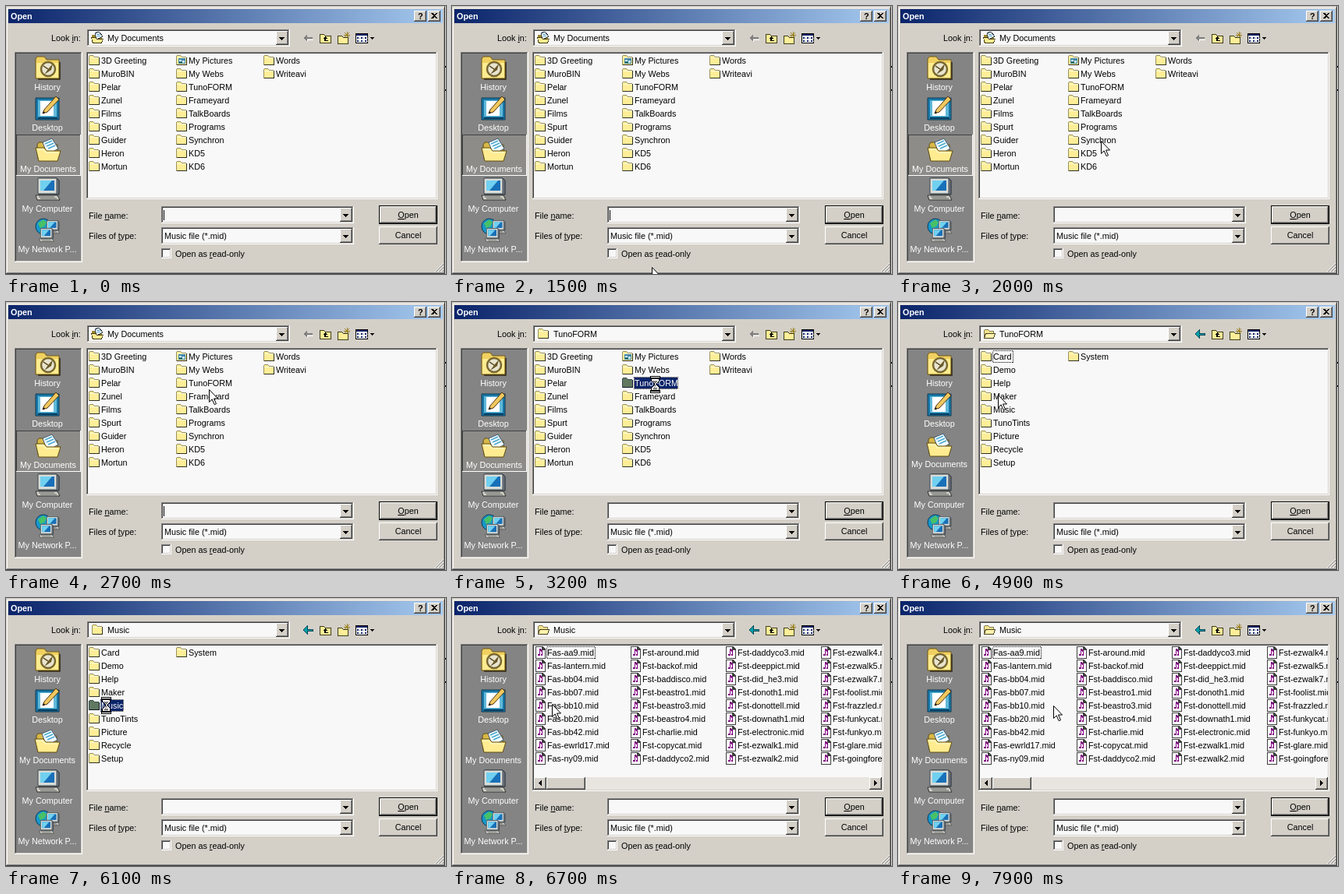
An HTML page for the animation above (8 s loop, 564 by 344 pixels).

```html
<!DOCTYPE html>
<html lang="en">
<head>
<meta charset="utf-8">
<title>Open dialog</title>
<style>
  html, body { margin: 0; width: 100%; height: 100%; overflow: hidden; background: #d4d0c8; }
  svg { display: block; shape-rendering: crispEdges; }
  text { font: 10.8px "Liberation Sans", Arial, sans-serif; white-space: pre; }
  .u { text-decoration: underline; }
  .smooth { shape-rendering: auto; }
</style>
</head>
<body>
<svg id="stage" width="564" height="344" viewBox="0 0 564 344">
  <defs>
    <linearGradient id="title">
      <stop offset="0" stop-color="#0a246a"/><stop offset="1" stop-color="#a6caf0"/>
    </linearGradient>
    <clipPath id="listClip"><path d="M105 61H551V246H105z"/></clipPath>

    <g id="folder">
      <path d="M1 2l1-1h4l2 2h6v11H1z" fill="#989060"/>
      <path d="M2 2h4l2 2h6v9H2z" fill="#ffee98"/>
      <path d="M2 4h12v1H2z" fill="#fffbd8"/>
      <path d="M14 4h1v10H2v-1h12z" fill="#303020"/>
    </g>
    <g id="pickedFolder">
      <path d="M1 2l1-1h4l2 2h6v11H1z" fill="#384a50"/>
      <path d="M2 2h4l2 2h6v9H2z" fill="#607860"/>
      <path d="M14 4h1v10H2v-1h12z" fill="#101828"/>
    </g>
    <g id="openFolder">
      <path d="M1 3l1-1h4l2 2h6v10H1z" fill="#807850"/>
      <path d="M2 3h4l2 2h5v3H2z" fill="#f4e490"/>
      <path d="M3 7h13l-2 7H1z" fill="#484020"/>
      <path d="M4 8h11l-2 5H2z" fill="#fff2ac"/>
    </g>
    <g id="docs">
      <path d="M1 4h5l1 1h7v9H1z" fill="#a08830"/>
      <path d="M5 2l5-2 5 6-8 4z" fill="#fff" stroke="#304050"/>
      <path d="M7 4l4-1M8 6l4-1" stroke="#48a0c8"/>
      <path d="M0 7h6l1 2h9l-2 6H2z" fill="#403810"/>
      <path d="M1 8h5l1 2h8l-2 4H3z" fill="#ffec90"/>
    </g>
    <g id="pictures">
      <use href="#folder"/>
      <path d="M4 5h9v7H4z" fill="#4088a8"/>
      <path d="M5 7h3v2H5zM9 8h3v3H9z" fill="#d8f0f8"/>
      <path d="M5 10h4v1H5z" fill="#205838"/>
    </g>
    <g id="midi">
      <path d="M0 0h9l4 4v12H0z" fill="#404040"/>
      <path d="M1 1h7v4h4v10H1z" fill="#fff"/>
      <path d="M5 3h1l3 3v2h-1l-2-2v6H3v-2h2zM7 10h2v2H7z" fill="#800080"/>
      <path d="M8 7h1v5H8z" fill="#800080"/>
    </g>

    <g id="bigHistory" class="smooth">
      <path d="M1 4l2-3h9l3 4h16v24H1z" fill="#f0d060" stroke="#705818"/>
      <path d="M2 9h28v19H2z" fill="#ffec90"/>
      <path d="M32 8v22H4" fill="none" stroke="#302810" stroke-width="1.5"/>
      <circle cx="17" cy="17" r="9" fill="#e8e4d0" stroke="#786830" stroke-width="2.5"/>
      <path d="M17 17l6-7-2 8-9 6z" fill="#685828"/>
      <path d="M17 17l-6-4" stroke="#503c10" stroke-width="1.5"/>
    </g>
    <g id="bigDesktop" class="smooth">
      <path d="M1 2h30v28H1z" fill="#1878a8" stroke="#103850"/>
      <path d="M4 5h24v21H4z" fill="#60b8d8"/>
      <path d="M7 6h17v19H7z" fill="#fff"/>
      <path d="M4 27h25v2H4z" fill="#0a4060"/>
      <path d="M10 22l2-5L27 0l4 4-15 16z" fill="#f0c860" stroke="#503008"/>
      <path d="M10 22l1-3 2 2z" fill="#000"/>
    </g>
    <g id="bigDocs" class="smooth">
      <path d="M2 9l2-3h8l2 3h14v18H3z" fill="#d8b848" stroke="#605018"/>
      <path d="M9 6l12-5 8 13-14 8z" fill="#f4fcff" stroke="#405870"/>
      <path d="M12 8l9-4M14 11l9-4M16 14l9-4" stroke="#48a8d0" stroke-width="1.5"/>
      <path d="M0 13h11l3 4h18l-4 13H4z" fill="#ffec90" stroke="#604c10"/>
      <path d="M2 15h8l3 4h16" fill="none" stroke="#fffbd8"/>
    </g>
    <g id="pc" class="smooth">
      <path d="M5 1h23l3 3v18H5z" fill="#707880" stroke="#202830"/>
      <path d="M4 1h24v20H4z" fill="#d8dcd8" stroke="#404850"/>
      <path d="M7 4h18v13H7z" fill="#1870b8"/>
      <path d="M7 4h15L11 17H7z" fill="#70d0f0"/>
      <path d="M1 23h28l3 6H3z" fill="#d0d0c8" stroke="#303030"/>
      <path d="M5 25h20M7 27h21" stroke="#606060"/>
    </g>
    <g id="bigNetwork" class="smooth">
      <circle cx="11" cy="11" r="10" fill="#1898c8" stroke="#083860"/>
      <path d="M4 7l7-5 4 4-3 5-5 2zM7 15l6-1 1 5-4 1z" fill="#48c068"/>
      <use href="#pc" transform="translate(13 3) scale(.58)"/>
      <use href="#pc" transform="translate(5 13) scale(.6)"/>
    </g>

    <g id="arrow" class="smooth">
      <path d="M.5.5v16l3.7-3.6 3 6.8 2.3-1-3-6.7h5z" fill="#fff" stroke="#000"/>
    </g>
    <g id="hourglass">
      <path d="M-6-9H7v4H6v3L2 1v1l4 4v3h1v4H-6V9h1V6l4-4V1l-4-4v-2h-1z" fill="#000"/>
      <path d="M-5-8H6v1H-5zM-5 11H6v1H-5zM-4-5H5v2L1 1v1l4 4v3H-4V6l4-4V1l-4-4z" fill="#fff"/>
      <path d="M-2-3h1v1h-1zM0-3h1v1H0zM2-3h1v1H2zM-1-2h1v1h-1zM1-2h1v1H1zM0-1h1v1H0zM0 3h1v1H0zM-1 5h1v1h-1zM1 5h1v1H1zM-2 7h5v1h-5z" fill="#000"/>
    </g>
  </defs>
</svg>
<script>
const FACE = '#d4d0c8', FIELD = '#f8f8f8', NAVY = '#0a246a', DARK = '#404040', MID = '#808080';
const ROW = 17, TOP = 62;

const rect = (x, y, w, h, fill) => `<rect x="${x}" y="${y}" width="${w}" height="${h}" fill="${fill}"/>`;
const path = (d, fill, stroke = 'none') => `<path d="${d}" fill="${fill}" stroke="${stroke}"/>`;
const icon = (id, x, y) => `<use href="#${id}" x="${x}" y="${y}"/>`;
const text = (s, x, y, fill = '#000', more = '') => `<text x="${x}" y="${y}" fill="${fill}" ${more}>${s}</text>`;
const centered = (s, x, y, fill) => text(s, x, y, fill, 'text-anchor="middle"');
const bold = (s, x, y, fill) => text(s, x, y, fill, 'style="font-weight:bold"');
const group = (id, body, more = '') => `<g id="${id}" ${more}>${body}</g>`;
const key = c => `<tspan class="u">${c}</tspan>`;

// Two nested one-pixel edges around a fill
const bevel = (x, y, w, h, fill, [lightOut, darkOut, lightIn, darkIn]) =>
  rect(x, y, w, h, darkOut) + rect(x, y, w - 1, h - 1, lightOut) +
  rect(x + 1, y + 1, w - 2, h - 2, darkIn) + rect(x + 1, y + 1, w - 3, h - 3, lightIn) +
  rect(x + 2, y + 2, w - 4, h - 4, fill);
const raised = (x, y, w, h) => bevel(x, y, w, h, FACE, ['#fff', DARK, FACE, MID]);
const sunken = (x, y, w, h, fill = FIELD) => bevel(x, y, w, h, fill, [MID, '#fff', DARK, FACE]);

const combo = (x, y, w, h) => sunken(x, y, w, h) + raised(x + w - 18, y + 2, 16, h - 4) +
  path(`M${x + w - 14} ${y + h / 2 - 1}h7l-3.5 4z`, '#000');

const dotted = (x, y, w, h, color = '#000') =>
  `<rect x="${x + .5}" y="${y + .5}" width="${w - 1}" height="${h - 1}" fill="none" stroke="${color}" stroke-dasharray="1 1"/>`;

function listing(names, iconName, x, pitch, iconGap, textGap) {
  return names.map((name, i) => {
    const left = x + Math.floor(i / 9) * pitch, y = TOP + (i % 9) * ROW;
    const kind = name === 'My Pictures' ? 'pictures' : iconName;
    return icon(kind, left + iconGap, y) + text(name, left + textGap, y + 12);
  }).join('');
}

const picked = (name, x, row, width) => {
  const y = TOP + row * ROW;
  return rect(x, y, 16, 16, FIELD) + icon('pickedFolder', x, y) + rect(x + 16, y, width, 16, NAVY) +
    dotted(x + 16, y, width, 16, '#f5db95') + text(name, x + 17, y + 12, '#fff');
};

const home = ['3D Greeting', 'MuroBIN', 'Pelar', 'Zunel', 'Films', 'Spurt', 'Guider', 'Heron', 'Mortun',
  'My Pictures', 'My Webs', 'TunoFORM', 'Frameyard', 'TalkBoards', 'Programs', 'Synchron', 'KD5', 'KD6',
  'Words', 'Writeavi'];
const sub = ['Card', 'Demo', 'Help', 'Maker', 'Music', 'TunoTints', 'Picture', 'Recycle', 'Setup', 'System'];
const songs = ('aa9 lantern bb04 bb07 bb10 bb20 bb42 ewrld17 ny09 ' +
  'around backof baddisco beastro1 beastro3 beastro4 charlie copycat daddyco2 ' +
  'daddyco3 deeppict did_he3 donoth1 donottell downath1 electronic ezwalk1 ezwalk2 ' +
  'ezwalk4 ezwalk5 ezwalk7 foolist frazzled funkycat funkyo glare goingfore')
  .split(' ').map((s, i) => (i < 9 ? 'Fas-' : 'Fst-') + s + '.mid');

function frameAndTitle() {
  return rect(0, 0, 564, 344, FACE) + rect(1, 2, 560, 1, '#fff') + rect(1, 2, 1, 340, '#fff') +
    rect(561, 2, 1, 341, MID) + rect(562, 0, 1, 344, DARK) + rect(563, 0, 1, 344, '#e8e6e0') +
    rect(1, 342, 561, 1, MID) + rect(0, 343, 563, 1, DARK) +
    rect(563, 77, 1, 2, '#000') + rect(563, 107, 1, 2, '#000') +
    rect(3, 4, 557, 18, 'url(#title)') +
    bold('Open', 6, 17, '#fff') +
    raised(523, 6, 16, 14) + raised(541, 6, 16, 14) +
    bold('?', 528, 17, '#000') +
    path('M545 9h2l2 2 2-2h2l-3 3.5 3 3.5h-2l-2-2-2 2h-2l3-3.5z', '#000') +
    [0, 4, 8].map(d => path(`M${551 + d} 341L561 ${331 + d}`, 'none', MID) +
      path(`M${550 + d} 341L561 ${330 + d}`, 'none', '#fff')).join('');
}

function toolbar() {
  const backArrow = 'M381 41l5-5v4h7v2h-7v4z';
  return text(`Look ${key('i')}n:`, 58, 45) + combo(104, 30, 260, 22) +
    group('backOff', path(backArrow, MID) + path('M386 46v-3h8', 'none', '#fff')) +
    group('backOn', path(backArrow, '#00a0a8', '#004858')) +
    path('M402.5 36.5h5l2 2h7v9h-14z', '#ffee98', '#403c18') +
    path('M406 42l3-3 3 3h-2v2h3v1h-5v-3z', '#000') +
    path('M425.5 38.5h5l2 2h6v8h-13z', '#ffee98', '#403c18') +
    path('M437 33v7M433 37h8M434 34l6 6M440 34l-6 6', 'none', '#988018') +
    path('M448.5 35.5h15v12h-15z', '#fff', '#000') + rect(449, 36, 14, 2, NAVY) +
    [0, 5, 10].map(d => rect(450 + d, 40, 2, 2, NAVY) + rect(450 + d, 44, 2, 2, NAVY) +
      rect(453 + d, 41, 1, 1, MID) + rect(453 + d, 45, 1, 1, MID)).join('') +
    path('M466 40h6l-3 3z', '#000');
}

function sidebar() {
  const places = [['History', 'bigHistory'], ['Desktop', 'bigDesktop'], ['My Documents', 'bigDocs'],
    ['My Computer', 'pc'], ['My Network P...', 'bigNetwork']];
  const pressed = rect(13, 165, 83, 53, '#fff') + rect(13, 165, 82, 52, DARK) + rect(14, 166, 81, 51, '#8e8c88');
  return sunken(11, 59, 87, 270, '#848484') + group('pressed', pressed) +
    places.map(([label, id], i) => group('place' + i,
      icon(id, 37, 64 + i * 52) + centered(label, 53, 108 + i * 52, '#fff'))).join('');
}

function form() {
  return text(`File ${key('n')}ame:`, 106, 273) + combo(199, 257, 247, 22) +
    text(`Files of ${key('t')}ype:`, 106, 299) + combo(199, 284, 247, 22) +
    text('Music file (*.mid)', 203, 299) +
    sunken(199, 311, 13, 13) + text(`Open as ${key('r')}ead-only`, 217, 322) +
    rect(478, 256, 75, 24, '#000') + raised(479, 257, 73, 22) + raised(478, 283, 75, 23) +
    centered(`${key('O')}pen`, 515.5, 272) + centered('Cancel', 515.5, 298) +
    group('caret', rect(202, 262, 1, 13, '#000'));
}

function scrollbar() {
  return rect(105, 230, 446, 16, '#e8e5e0') +
    raised(105, 230, 16, 16) + raised(121, 230, 50, 16) + raised(535, 230, 16, 16) +
    path('M115 234v7l-4-3.5zM541 234v7l4-3.5z', '#000');
}

const place = (id, iconName, label) => group(id, icon(iconName, 109, 33) + text(label, 130, 45));

document.getElementById('stage').insertAdjacentHTML('beforeend',
  frameAndTitle() + toolbar() +
  place('inDocs', 'docs', 'My Documents') +
  place('inSubClosed', 'folder', 'TunoFORM') + place('inSub', 'openFolder', 'TunoFORM') +
  place('inMusicClosed', 'folder', 'Music') + place('inMusic', 'openFolder', 'Music') +
  sidebar() + sunken(103, 59, 450, 189) +
  group('home', listing(home, 'folder', 105, 112, 0, 17)) +
  group('sub', listing(sub, 'folder', 105, 112, 0, 17)) +
  group('songs', listing(songs, 'midi', 105, 122, 2, 17) + scrollbar(), 'clip-path="url(#listClip)"') +
  group('focusCard', dotted(121, 62, 27, 16)) + group('focusSong', dotted(121, 62, 63, 16)) +
  group('pickSub', picked('TunoFORM', 217, 2, 57)) + group('pickMusic', picked('Music', 105, 4, 30)) +
  form() +
  group('pointer', group('idle', icon('arrow', 0, 0)) + group('busy', icon('hourglass', 0, 0))));

// Each part lists the [from, to) spans, in ms, in which it shows
const END = 8000;
const shown = {
  caret: [[0, 600], [1200, 1800], [2500, 3000]],
  home: [[0, 3500]], sub: [[3500, 6700]], songs: [[6700, END]],
  inDocs: [[0, 3200]], inSubClosed: [[3200, 3500]], inSub: [[3500, 6100]],
  inMusicClosed: [[6100, 6700]], inMusic: [[6700, END]],
  pressed: [[0, 3500]], backOff: [[0, 3500]], backOn: [[3500, END]],
  focusCard: [[3500, 5500]], focusSong: [[6700, END]],
  pickSub: [[3100, 3500]], pickMusic: [[5500, 6700]],
  pointer: [[1500, END]],
  busy: [[3200, 3500], [6100, 6700]], idle: [[0, 3200], [3500, 6100], [6700, END]],
};
// Pointer stops: time, x, y
const stops = [[1500, 256, 335], [1600, 260, 321], [1800, 260, 278], [1900, 260, 222], [2000, 260, 173],
  [2300, 260, 152], [2500, 260, 125], [2700, 260, 112], [3000, 260, 104], [4300, 212, 104], [4400, 160, 104],
  [4600, 138, 106], [4700, 127, 106], [4900, 128, 119], [5000, 128, 129], [5100, 128, 136], [7900, 199, 138]];

const part = id => document.getElementById(id);

function draw(now) {
  const t = now % END;
  for (const id in shown)
    part(id).style.display = shown[id].some(([a, b]) => t >= a && t < b) ? '' : 'none';
  const [, x, y] = stops.findLast(s => s[0] <= t) || stops[0];
  part('pointer').setAttribute('transform', `translate(${x} ${y})`);
  const shift = t < 3500 ? 1 : 0;
  part('place2').setAttribute('transform', `translate(${shift} ${shift})`);
}

const start = performance.now();
(function tick() {
  draw(performance.now() - start);
  requestAnimationFrame(tick);
})();
</script>
</body>
</html>
```
